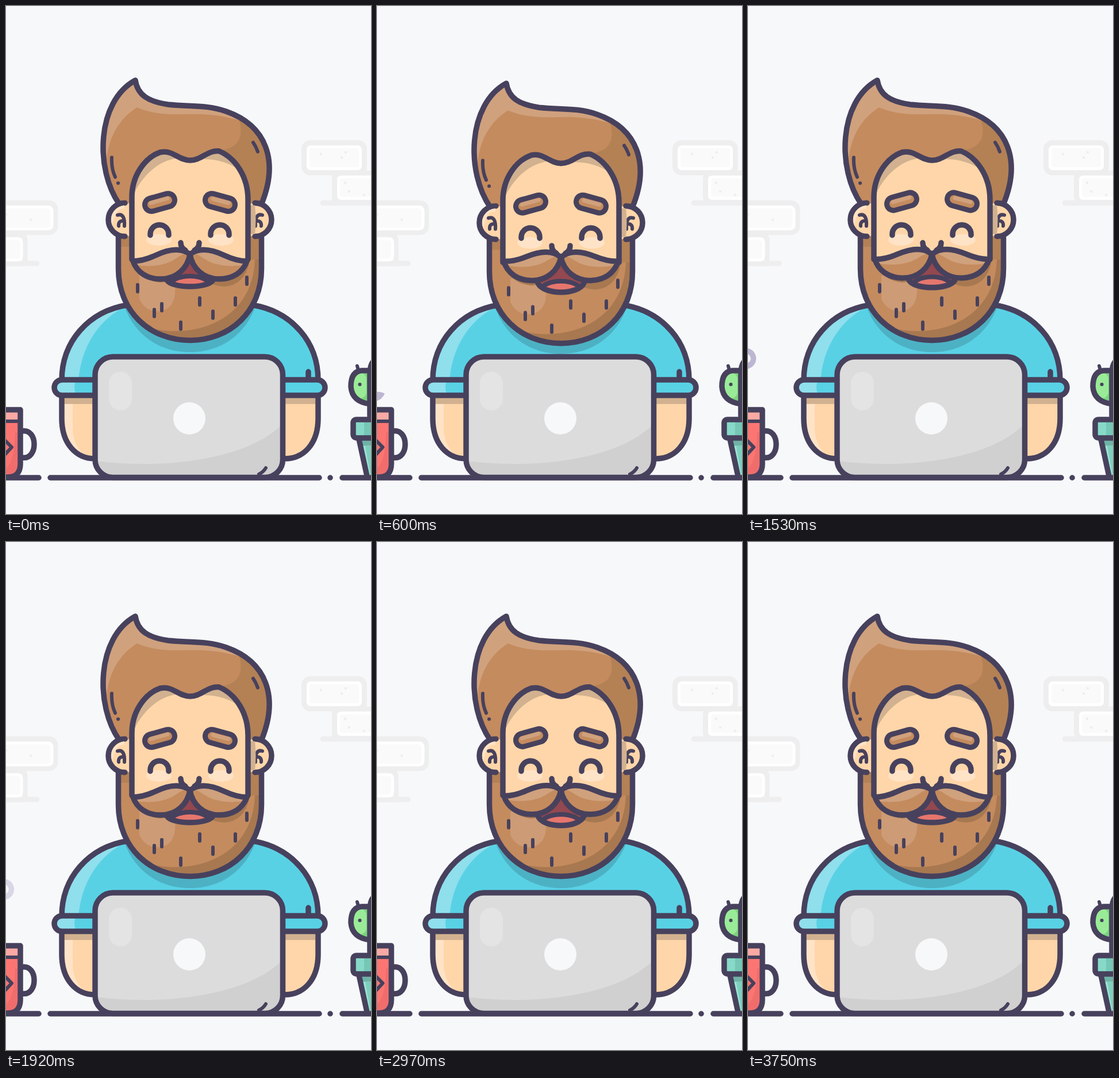
Animation, 635 px wide and 882 px high, one loop 3.78 s. Source, as an HTML page:

```html
<!DOCTYPE html>
<html lang="en">
<head>
<meta charset="utf-8">
<title>Man at a laptop</title>
<style>
html, body { margin: 0; width: 100%; height: 100%; overflow: hidden; background: #f7f8fa; }
svg { display: block; width: 100%; height: 100%; }
.ln { fill: none; stroke: #47415d; stroke-width: 9.5; stroke-linecap: round; stroke-linejoin: round; }
.thin { stroke-width: 6; }
.wall { fill: none; stroke: #eeeeef; stroke-width: 9; stroke-linecap: round; }
.skin { fill: #ffd6a9; } .glow { fill: #ffe3c7; } .dim { fill: #d1b18f; }
.hair { fill: #c48b5e; } .hairHi { fill: #d0a17d; } .hairLo { fill: #b48155; } .deep { fill: #a87850; }
.shirt { fill: #59d1e5; } .shirtHi { fill: #8fdfed; }
</style>
</head>
<body>
<svg viewBox="0 0 635 882" xmlns="http://www.w3.org/2000/svg">
<defs>
  <path id="hairP" d="M197 344C155 284 157 166 225 129C229 155 248 166 282 171C320 175 348 171 383 183C452 207 476 268 444 345L320 380Z"/>
  <path id="beardP" d="M195.500 390V456C195.500 530 250 580.500 320 580.500C390 580.500 444.500 530 444.500 456V390Z"/>
  <path id="faceP" d="M219 440V332C219 294 242 263 268 254C290 249 300 268 320 268C340 268 350 250 371 252C399 264 421 296 421 336V440Q370 462 320 440Q270 462 219 440Z"/>
  <path id="shirtP" d="M97 652C97 583 143 530 212 519H428C497 530 543 583 543 652V680H97Z"/>
  <path id="stacheP" d="M320 431C302 417 279 424 260 433C247 439 233 443 221 443C228 463 246 474 269 474C297 474 316 455 320 431Z"/>
  <rect id="lapP" x="155" y="609" width="326.500" height="209.500" rx="31"/>
  <path id="mugP" d="M-9 701H25V795Q25 818 2 818H-9Z"/>
  <clipPath id="hairC"><use href="#hairP"/></clipPath>
  <clipPath id="beardC"><use href="#beardP"/></clipPath>
  <clipPath id="faceC"><use href="#faceP"/></clipPath>
  <clipPath id="shirtC"><use href="#shirtP"/></clipPath>
  <clipPath id="stacheC"><use href="#stacheP"/></clipPath>
  <clipPath id="lapC"><use href="#lapP"/></clipPath>
  <clipPath id="mugC"><use href="#mugP"/></clipPath>
  <clipPath id="mouthC"><path id="mouthClip"/></clipPath>
  <g id="stache">
    <use href="#stacheP" class="hair"/>
    <path class="hairHi" clip-path="url(#stacheC)" d="M215 435L300 415L322 430C304 427 300 440 278 447C255 454 235 451 215 449Z"/>
    <use href="#stacheP" class="ln"/>
  </g>
  <g id="ear">
    <circle class="skin" cx="208" cy="371" r="29"/>
    <path class="ln" d="M207 342A29 29 0 0 0 207 400"/>
    <path class="ln thin" d="M194 363C203 360 207 368 206 382M204 373Q195 373 196 382"/>
  </g>
</defs>

<rect width="635" height="882" fill="#f7f8fa"/>

<!-- wall -->
<g class="wall">
  <rect x="-30" y="342" width="116" height="51" rx="11" fill="#fafafa"/>
  <path d="M-9 398H24Q33 398 33 407V447H-9" fill="#fafafa"/>
  <path d="M-9 447H54"/>
  <rect x="518.500" y="237.500" width="105" height="52" rx="11" fill="#fafafa"/>
  <rect x="571.500" y="290" width="90" height="51" rx="10" fill="#fafafa"/>
  <path d="M551 342H645"/>
  <g stroke="#fff" stroke-width="5">
    <path d="M-9 349H72Q80 349 80 357V379Q80 387 72 387H-9M-9 404H20Q27 404 27 411V434Q27 441 20 441H-9"/>
    <rect x="525.500" y="244.500" width="91" height="38" rx="6"/>
    <rect x="578.500" y="297" width="80" height="37" rx="6"/>
  </g>
  <path stroke-width="4.500" d="M0 362h.1M43 371h.1M548 257h.1M584 263h.1M591 254h.1M590 307h.1M597 322h.1M623 328h.1"/>
</g>

<!-- steam -->
<g id="steam" fill="#bcb6d3">
  <path id="leaf" d="M-12 674C-6 669 5 668 14 673C9 682 4 687 -12 687Z"/>
  <path id="ring" d="M-15 676A13.500 13.500 0 1 1 -3 681.500A13.500 13.500 0 0 1 -15 676" fill="none" stroke="#bcb6d3" stroke-width="9.500" pathLength="100"/>
</g>

<!-- mug -->
<path class="ln" d="M28 738C56 733 56 789 28 784"/>
<use href="#mugP" fill="#fb7672"/>
<g clip-path="url(#mugC)">
  <path fill="#f06d6c" d="M30 742V820H-9V806Q14 806 16 740Z"/>
  <path fill="#fca9a4" d="M-9 701H30V721H-9Z"/>
</g>
<path class="ln thin" d="M-9 721H24M-3 753L10 766L-3 780"/>
<use href="#mugP" class="ln"/>

<!-- cactus -->
<path fill="#7bd37d" d="M640 632H620Q600 634 600 660Q600 690 640 693Z"/>
<rect fill="#9aeb98" x="605" y="637" width="22" height="44" rx="11"/>
<path class="ln" d="M640 633H619Q600 634 600 661Q602 687 633 691"/>
<path class="ln" d="M640 616Q633 622 633 640V712"/>
<path class="ln thin" d="M611 625L613 632M615.500 657h.1"/>
<path fill="#7fcfbe" d="M613 752H640V818H628Z"/>
<path fill="#9be3d4" d="M617 764H625L634 814H627Z"/>
<path fill="#6fb3a6" d="M614 752H640V763H617Z"/>
<path class="ln" d="M614 752L628 816"/>
<path fill="#87d9c8" d="M640 718H610Q604 718 604 724V743Q604 750 611 750H640Z"/>
<path fill="#75c7b6" d="M623 722H640V746H623Z"/>
<path class="ln" d="M640 718H610Q604 718 604 724V743Q604 750 611 750H640"/>

<!-- body -->
<use href="#shirtP" class="shirt"/>
<g clip-path="url(#shirtC)">
  <path class="shirtHi" d="M90 655V515H228C166 532 129 590 126 655Z"/>
  <path id="shade" fill="#4db1c4" d="M195 456C195 550 250 601 320 601C390 601 445 550 445 456Z"/>
</g>
<path class="ln" d="M97 650C97 583 143 530 212 519M428 519C497 530 543 583 543 650M526 635V650"/>
<path class="skin" d="M97 678V716C97 760 122 786 155 786H487C518 786 543 760 543 716V678Z"/>
<path class="glow" d="M97 678H116V735Q117 764 139 782C112 776 97 750 97 716Z"/>
<path class="dim" d="M101 678H160V691H101ZM480 678H539V691H480Z"/>
<path class="ln" d="M97 680V716C97 760 122 786 155 786M543 680V716C543 760 518 786 485 786"/>
<rect class="shirt" x="84" y="649" width="471" height="27" rx="13.500"/>
<path class="shirtHi" d="M98 649H122Q116 662 122 676H98A13.500 13.500 0 0 1 98 649Z"/>
<rect class="ln" x="84" y="649" width="471" height="27" rx="13.500"/>

<g id="head">
  <use href="#hairP" class="hair"/>
  <g clip-path="url(#hairC)">
    <path class="hairHi" d="M150 300V110H240L290 165L385 180L405 198C350 183 322 189 291 188C264 187 247 184 228 176C186 202 168 252 177 306Z"/>
    <path class="hairLo" d="M402 188C414 218 412 247 372 250L421 300V360H470V200Z"/>
  </g>
  <use href="#hairP" class="ln"/>
  <path class="ln thin" d="M184 263Q183 282 190 297M195 307.500h.1M430 237Q435 244 438 253"/>

  <use href="#beardP" class="hair"/>
  <g clip-path="url(#beardC)">
    <path class="deep" d="M450 440V590H210V540C270 586 428 575 433 440Z"/>
    <path class="hairHi" opacity=".75" d="M232 468H293Q296 490 293 506Q287 530 262 530Q242 529 232 509Z"/>
    <path class="deep" d="M219 443Q232 476 268 480Q297 479 320 450Q345 486 380 487Q415 485 424 443Z"/>
    <path class="hairLo" d="M195 390H219V418H195ZM421 390H445V440H421Z"/>
  </g>
  <use href="#beardP" class="ln"/>
  <path id="dashes" class="ln thin"/>

  <use href="#ear"/>
  <path class="glow" d="M206 346A25 25 0 0 0 185 381Q190 350 206 352Z"/>
  <use href="#ear" transform="translate(640 0) scale(-1 1)"/>
  <path class="dim" d="M425 346H433Q436 371 433 396H425Z"/>

  <use href="#faceP" class="dim"/>
  <path class="skin" clip-path="url(#faceC)" d="M219 460V335C232 300 262 268 300 264C312 269 328 274 344 266C362 266 398 270 421 300V460Z"/>
  <ellipse class="glow" cx="266" cy="406" rx="22" ry="10"/>
  <ellipse class="glow" cx="374" cy="406" rx="22" ry="10"/>
  <path class="ln" d="M219 440V332C219 294 242 263 268 254C290 249 300 268 320 268C340 268 350 250 371 252C399 264 421 296 421 336V440"/>
  <path class="ln" d="M251 398V396A16 16 0 0 1 283 396V398M356 398V396A16 16 0 0 1 388 396V398"/>
  <path class="ln" stroke-width="8" d="M304 411Q304 420 312 424M336 411Q336 420 328 424"/>

  <g id="brows"></g>

  <path id="mouth" fill="#94484f"/>
  <g clip-path="url(#mouthC)"><ellipse id="tongue" cx="320" rx="35" ry="17" fill="#e6766d" stroke="#47415d" stroke-width="8"/></g>
  <path id="lips" class="ln"/>
  <use id="stacheL" href="#stache"/>
  <use id="stacheR" href="#stache"/>
</g>

<!-- laptop -->
<use href="#lapP" fill="#dcdcdc"/>
<g clip-path="url(#lapC)">
  <path fill="#d0d0d0" d="M150 789C290 808 434 782 486 720V825H150Z"/>
</g>
<rect x="179" y="635" width="40" height="67" rx="20" fill="#e4e4e4"/>
<circle cx="319" cy="716" r="28" fill="#f7f8fa"/>
<path class="ln thin" d="M452 802Q448 809 440 813"/>
<use href="#lapP" class="ln"/>
<path class="ln" d="M-9 819H57M77 819H545M564 819h.1M585 819H645"/>
</svg>

<script>
const LOOP = 3780, LAUGH = LOOP / 2, BOB = 1100;
const el = id => document.getElementById(id);
const set = (id, name, value) => el(id).setAttribute(name, value);
const clamp = x => Math.max(0, Math.min(1, x));
const span = (t, a, b) => clamp((t - a) / (b - a));
const ease = x => (1 - Math.cos(Math.PI * x)) / 2;
const ramp = (t, a, b) => ease(span(t, a, b));

const stubble = [[229, 490], [258, 533], [271, 523], [304, 555], [337, 513], [360, 536], [399, 513], [419, 477]];
set('dashes', 'd', stubble.map(([x, y]) => `M${x} ${y - 6}v12`).join(''));

const brow = `<path d="M253 345L282 337" stroke="#47415d" stroke-width="32"/>
  <path d="M253 345L282 337" stroke="#c48b5e" stroke-width="14"/>`;
const shine = d => `<path d="${d}" stroke="#d0a17d" stroke-width="7"/>`;
el('brows').innerHTML = `<g fill="none" stroke-linecap="round">
  ${brow}${shine('M252 342L281 334')}
  <g transform="translate(640 0) scale(-1 1)">${brow}${shine('M253 342L280 335')}</g></g>`;

function drawMouth(open) {
  const low = 487 + 5.5 * open;
  const ctrl = 476 + (low - 476) * 4 / 3;
  const arc = `M280 476C290 ${ctrl} 350 ${ctrl} 360 476`;
  set('mouth', 'd', arc + 'L320 436Z');
  set('mouthClip', 'd', arc + 'L320 436Z');
  set('lips', 'd', arc);
  set('tongue', 'cy', 486 + 4 * open);
}

function drawSteam(t) {
  const grow = ramp(t, 420, 620);
  const rise = -65 * ramp(t, 1130, 1660);
  set('leaf', 'transform', `translate(${-22 * (1 - grow)} 0)`);
  set('leaf', 'opacity', 1 - span(t, 800, 980));
  set('ring', 'stroke-dasharray', `${100 * ramp(t, 700, 1080)} 200`);
  set('ring', 'opacity', t > 700 ? 1 : 0);
  set('steam', 'transform', `translate(0 ${rise})`);
  set('steam', 'opacity', t < 420 ? 0 : 1 - span(t, 1680, 2160));
}

function draw(t) {
  const bob = t < BOB ? Math.sin(Math.PI * t / BOB) ** 2 : 0;
  set('head', 'transform', `translate(0 ${5.3 * bob})`);
  set('shade', 'transform', `translate(0 ${3 * bob})`);

  const p = t % LAUGH / LAUGH;
  drawMouth(ramp(p, 0, .42) - ramp(p, .52, 1));
  const lift = ramp(p, .04, .3) - .75 * ramp(p, .36, .52) + .75 * ramp(p, .53, .65) - ramp(p, .7, .98);
  set('brows', 'transform', `translate(0 ${-2.4 * lift})`);
  const turn = `rotate(${2.9 * lift} 320 432)`;
  set('stacheL', 'transform', turn);
  set('stacheR', 'transform', 'translate(640 0) scale(-1 1) ' + turn);

  drawSteam(t);
}

function frame() {
  draw(performance.now() % LOOP);
  requestAnimationFrame(frame);
}
draw(0);
requestAnimationFrame(frame);
</script>
</body>
</html>
```
